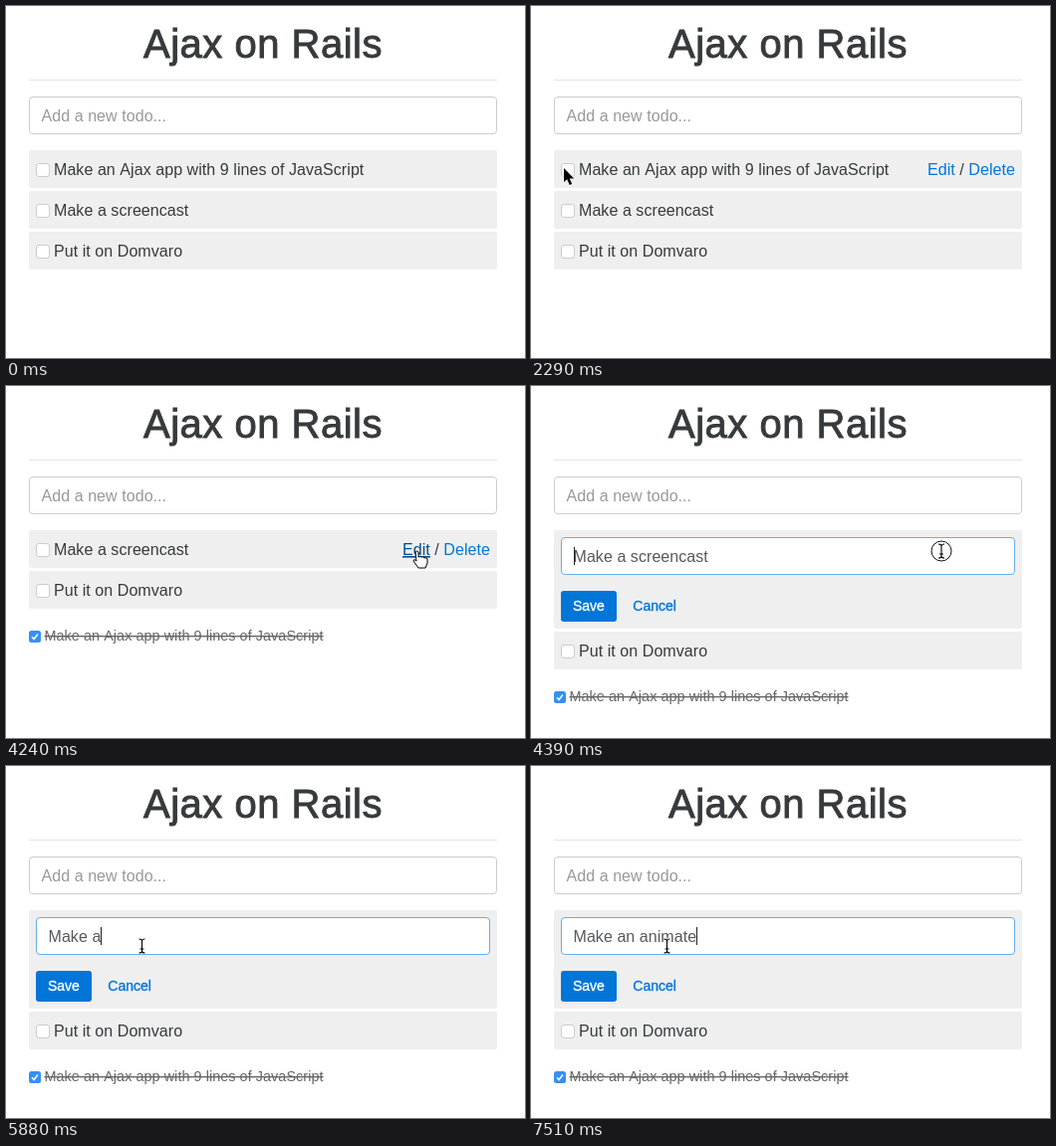
An HTML page that plays this animation: 521 by 354 pixels, repeating every 8 s.

```html
<!DOCTYPE html>
<html lang="en">
<head>
<meta charset="utf-8">
<title>Ajax on Rails</title>
<style>
  html, body { margin: 0; width: 100%; height: 100%; overflow: hidden; background: #fff; }
  svg { display: block; }
  text {
    font: 16px "Liberation Sans", Arial, sans-serif;
    letter-spacing: .004em; font-kerning: none; fill: #373a3c;
  }
  .title { font-size: 40px; letter-spacing: .5px; text-anchor: middle; stroke: #373a3c; stroke-width: .9px; }
  .placeholder { fill: #999; }
  .link { fill: #0275d8; }
  .hover { fill: #014c8c; text-decoration: underline; }
  .links { text-anchor: end; }
  .done { font-size: 14.4px; fill: #666; text-decoration: line-through; }
  .field { fill: #55595c; }
  .button { font-size: 14px; letter-spacing: 0; stroke-width: .35px; }
  .save { fill: #fff; stroke: #fff; }
  .cancel { fill: #0275d8; stroke: #0275d8; }
</style>
</head>
<body>
<svg id="stage" width="521" height="354" viewBox="0 0 521 354"></svg>
<script>
const LOOP = 8000;
const LONG_TODO = 'Make an Ajax app with 9 lines of JavaScript';
const SHORT_TODO = 'Make a screencast';
const LAST_TODO = 'Put it on Domvaro';
const CHECKED = 2740, MOVED = 2890, EDITING = 4390;
const FIELD_X = 42.5;

// time, x, y, shape, click ring
const pointerKeys = [
  [0], [500, 491, 55, 'arrow'], [650],
  [1100, 12, 164, 'arrow'], [1250, 17, 160, 'arrow'], [1400, 24, 159, 'arrow'],
  [1550, 29, 160, 'arrow'], [1700, 32, 162, 'arrow'], [1840, 33, 163, 'arrow'],
  [2740, 33, 163, 'arrow', true], [2890, 33, 163, 'arrow'],
  [3490, 140, 150, 'arrow'], [3640, 218, 152, 'arrow'], [3790, 303, 156, 'arrow'],
  [3940, 370, 160, 'arrow'], [4090, 403, 165, 'hand'], [4240, 412, 166, 'hand'],
  [4390, 412, 166, 'beam', true], [4540, 388, 160, 'beam'], [4690, 308, 155, 'beam'],
  [4840, 222, 162, 'beam'], [4990, 158, 175, 'beam'], [5130, 136.5, 181, 'beam'],
  [5430, 137.5, 180, 'beam', true], [5580, 136.5, 181, 'beam']
];

// time, field text, caret index (-1 hides it), word selected
const fieldKeys = [
  [EDITING, SHORT_TODO, 0], [4990, SHORT_TODO, -1], [5430, SHORT_TODO, SHORT_TODO.length],
  [5580, SHORT_TODO, -1, true], [5880, 'Make a', 6],
  ...[...'n animate'].map((_, i) => [
    6330 + Math.floor(i * 147.5), 'Make a' + 'n animate'.slice(0, i + 1), 7 + i
  ])
];

const shapes = {
  arrow: '<path d="M0 0V14.2L3.2 11.2L5.7 17L8.2 16L5.7 10.4H10.2Z" stroke="#fff" stroke-width="1.2" paint-order="stroke"/>',
  hand: '<path d="M-1 1q2-2 3 0v5q2-1 3 0q2-1 3 1q2-1 3 1v4l-2 5h-7l-5-7q0-2 2-1l1 1z" fill="#fff" stroke="#000"/>',
  beam: ['#fff', '#000'].map((color, i) =>
    `<path d="M-3-7Q0-7 0-5Q0-7 3-7M0-6V6M-3 7Q0 7 0 5Q0 7 3 7M-2 3H2" fill="none" stroke="${color}" stroke-width="${i ? 1.1 : 2.4}"/>`).join('')
};

const current = (keys, t) => keys.filter(key => key[0] <= t).pop();

const box = (x, y, w, h, fill, r = 0, stroke = 'none') =>
  `<rect x="${x}" y="${y}" width="${w}" height="${h}" rx="${r}" fill="${fill}" stroke="${stroke}"/>`;

const text = (x, y, label, style = '') =>
  `<text x="${x}" y="${y}" class="${style}" xml:space="preserve">${label}</text>`;

function checkbox(x, y, size, checked) {
  if (!checked) return box(x + .5, y + .5, size - 1, size - 1, '#fff', 2.5, '#ccc');
  const k = size / 12;
  return box(x, y, size, size, '#3490f5', 2.5) +
    `<path d="M${x + 3 * k} ${y + 6.3 * k}l${2 * k} ${2.2 * k}l${4 * k}-${5 * k}" fill="none" stroke="#fff" stroke-width="1.5"/>`;
}

const row = (y, label, checked) =>
  box(23, y, 470, 38, '#efefef', 2) + checkbox(30, y + 13, 14, checked) + text(48, y + 25, label);

const doneRow = y => checkbox(23, y, 12, true) + text(38.5, y + 10, LONG_TODO, 'done');

const rowLinks = hovered => text(486, 170,
  `<tspan class="link ${hovered ? 'hover' : ''}">Edit</tspan> / <tspan class="link">Delete</tspan>`, 'links');

function editor(t) {
  const [, value, caret, selected] = current(fieldKeys, t);
  return box(23, 145, 470, 99, '#efefef', 2) +
    box(30.5, 152.5, 455, 37, '#fff', 3.5, '#66afe9') +
    (selected ? box(99, 162, 80, 18, '#b3d7fe') : '') +
    text(FIELD_X, 177, value, 'field') +
    (caret < 0 ? '' : `<rect id="caret" data-index="${caret}" y="162" width="1" height="18" fill="#222"/>`) +
    box(30, 206, 56, 31, '#0275d8', 3) +
    text(42, 226, 'Save', 'button save') + text(102.3, 226, 'Cancel', 'button cancel');
}

function list(t, shape) {
  if (t >= EDITING) return editor(t) + row(247, LAST_TODO) + doneRow(307);
  const links = t >= 1400 ? rowLinks(shape === 'hand') : '';
  if (t >= MOVED) return row(145, SHORT_TODO) + links + row(186, LAST_TODO) + doneRow(246);
  return row(145, LONG_TODO, t >= CHECKED) + links + row(186, SHORT_TODO) + row(227, LAST_TODO);
}

function pointer([, x, y, shape, ring]) {
  if (!shape) return '';
  const halo = ring ? '<circle r="10" fill="#fff" fill-opacity=".3" stroke="#111"/>' : '';
  return `<g transform="translate(${x} ${y})">${halo}${shapes[shape]}</g>`;
}

const stage = document.getElementById('stage');
let shown = '';

function draw() {
  const t = performance.now() % LOOP;
  const key = current(pointerKeys, t);
  const scene = text(258, 52, 'Ajax on Rails', 'title') +
    box(23, 74, 470, 1, '#e5e5e5') +
    box(23.5, 91.5, 469, 37, '#fff', 3.5, '#ccc') +
    text(35.5, 116, 'Add a new todo...', 'placeholder') +
    list(t, key[3]) + pointer(key);
  if (scene !== shown) {
    stage.innerHTML = shown = scene;
    const caret = stage.querySelector('#caret');
    if (caret) {
      const typed = +caret.dataset.index ? stage.querySelector('.field').getComputedTextLength() : 0;
      caret.setAttribute('x', Math.round(FIELD_X + typed));
    }
  }
  requestAnimationFrame(draw);
}
draw();
</script>
</body>
</html>
```
